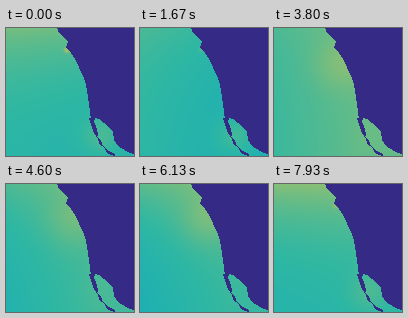
A matplotlib script for the animation above (7990 ms loop, 128 by 128 pixels).

```python
import numpy as np
import matplotlib.pyplot as plt
from matplotlib.animation import FuncAnimation
from matplotlib.colors import LinearSegmentedColormap
from matplotlib.path import Path

SIZE, FRAMES, LOOP_MS = 128, 120, 7990

# Land is 0; the sea only uses the teal to yellow part of the scale
colors = LinearSegmentedColormap.from_list("sea", [
    (0.00, (0.208, 0.166, 0.529)), (0.38, (0.023, 0.642, 0.791)),
    (0.50, (0.180, 0.718, 0.642)), (0.63, (0.530, 0.749, 0.466)),
    (0.75, (0.819, 0.733, 0.350)), (1.00, (0.976, 0.983, 0.054))], N=1024)

MAINLAND = [(51, -1), (52, 4), (57, 9), (62, 13), (60, 19), (65, 25),
            (69, 31), (77, 48), (80, 57), (83, 76), (85, 92), (89, 90),
            (93, 91), (103, 99), (107, 104), (108, 112), (112, 118),
            (120, 123), (129, 127), (129, -1)]
PENINSULA = [
    [(83, 90), (89, 90), (88, 94), (90, 98), (92, 106), (91, 110), (87, 103)],
    [(91, 109), (95, 113), (97, 118), (94, 117)],
    [(97, 118), (103, 123), (109, 126), (109, 128), (102, 126)],
]

px = np.arange(SIZE) + 0.5
X, Y = np.meshgrid(px, px)
points = np.column_stack([X.ravel(), Y.ravel()])
land = np.any([Path(p).contains_points(points) for p in [MAINLAND, *PENINSULA]],
              axis=0).reshape(SIZE, SIZE)


def spot(x, y, radius):
    return np.exp(-((X - x) ** 2 + (Y - y) ** 2) / (2 * radius ** 2))


def season(i, peak):
    """Yearly wave, one year per 12 steps, highest in the peak month."""
    return np.cos(2 * np.pi * (i - peak) / 12)


def pulse(i, center, width):
    return np.exp(-((i - center) / width) ** 2)


north = np.exp(-Y / 48)
south = 1 - north
shore = np.minimum(X, 88) / 88 - 0.5
cape = spot(66, 36, 18)
gulf = spot(95, 108, 14)
bay = spot(61, 22, 2)


def field(i):
    slow = np.cos(2 * np.pi * i / FRAMES)
    cold, warm = pulse(i, 14, 8), pulse(i, 57, 10)
    sea = (0.475
           + north * (0.07 + 0.07 * season(i, 9.5) + 0.04 * slow - 0.10 * cold)
           + south * 0.07 * warm
           + shore * 0.06 * season(i, 8.5)
           + cape * 0.06 * max(0, season(i, 8))
           + gulf * 0.035 * (1 + season(i, 1.5))
           + bay * 0.14 * max(0, season(i, 0)) ** 8)
    return np.where(land, 0, sea)


fig = plt.figure(figsize=(1.28, 1.28), dpi=100)
ax = fig.add_axes([0, 0, 1, 1])
ax.axis("off")
image = ax.imshow(field(0), cmap=colors, vmin=0, vmax=1,
                  interpolation="nearest", aspect="auto")


def update(i):
    image.set_data(field(i))
    return [image]


anim = FuncAnimation(fig, update, frames=FRAMES, interval=LOOP_MS / FRAMES,
                     repeat=True, repeat_delay=0, blit=False)
plt.show()
```
